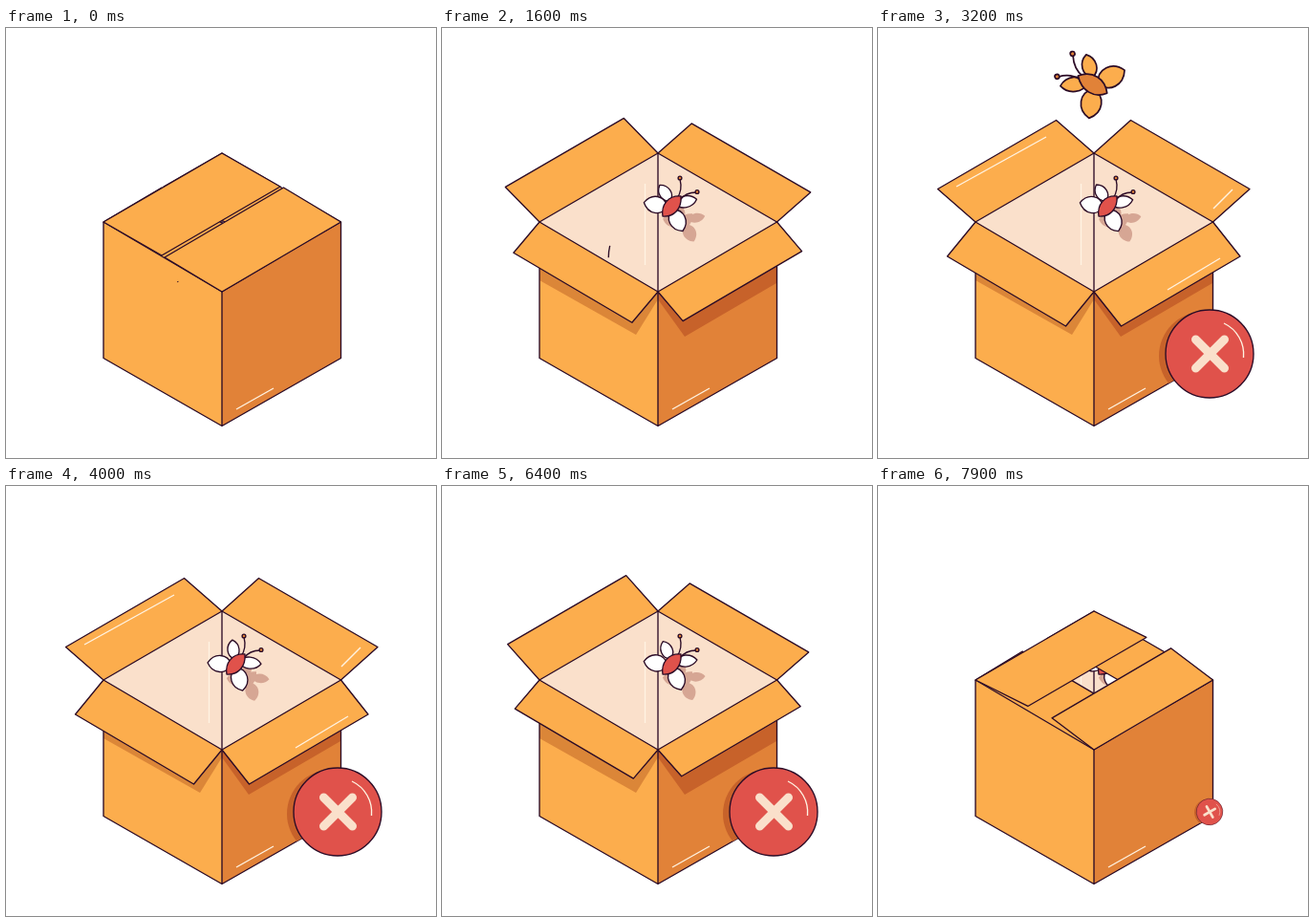
An HTML page that plays this animation: 450 by 450 pixels, repeating every 8 s.

```html
<!DOCTYPE html>
<html>
<head>
<meta charset="utf-8">
<style>
  html, body { margin: 0; width: 100%; height: 100%; overflow: hidden; background: #fff; }
  svg { display: block; width: 100vw; height: 100vh; }
</style>
</head>
<body>
<svg id="stage" viewBox="0 0 450 450"></svg>
<script>
const LOOP = 8000, STEP = 100;
const INK = '#2b0b26', ORANGE = '#fcad4d', DEEP = '#e18238', CREAM = '#fae0cb',
      RED = '#e0524b', SHADE = '#c7622a', SHINE = '#fff3e2';

const back = [226, 131], left = [102, 203], right = [350.5, 203], front = [226, 276];
const baseLeft = [102, 345.5], baseRight = [350.5, 345.5], base = [226, 416.5];
const faceRight = [front, right, baseRight, base];

// The free edge of a flap bends from closed to open; pace makes it lag or lead.
const flaps = [
  { hinge: [left, front], closed: [61, -36], bend: [-7, -2], open: [-29.5, 36], pace: 1 },
  { hinge: [back, right], closed: [-61, 35], bend: [6, 0], open: [38.5, -34.5], pace: 1 },
  { hinge: [left, back], closed: [61, 35], bend: [-11, -54], open: [-39.5, -34.5], pace: 1.3 },
  { hinge: [front, right], closed: [-60, -36], bend: [0, -30], open: [28.5, 36], pace: .82 }
];

const ramp = (t, from, to) => Math.min(1, Math.max(0, (t - from) / (to - from)));
const smooth = u => u * u * (3 - 2 * u);
const mix = (a, b, u) => a + (b - a) * u;
const between = (t, from, to, fade) => ramp(t, from, from + fade) - ramp(t, to, to + fade);

const poly = (points, fill, extra = '') =>
  `<polygon points="${points.join(' ')}" fill="${fill}" ${extra}/>`;
const line = (x1, y1, x2, y2, color = SHINE) =>
  `<line x1="${x1}" y1="${y1}" x2="${x2}" y2="${y2}" stroke="${color}"/>`;
const group = (transform, content, extra = '') => `<g transform="${transform}" ${extra}>${content}</g>`;

function flap({ hinge: [a, b], closed, bend, open, pace }, openness) {
  const q = openness ** pace;
  const [dx, dy] = closed.map((c, i) => mix(mix(c, bend[i], q), mix(bend[i], open[i], q), q));
  return poly([a, [a[0] + dx, a[1] + dy], [b[0] + dx, b[1] + dy], b], ORANGE, `stroke="${INK}"`);
}

function leaf(x, y, angle, length, width) {
  const w = width * .67;
  return group(`translate(${x} ${y}) rotate(${angle})`,
    `<path d="M0 0C${length * .2} ${-w} ${length * .75} ${-w} ${length} 0C${length * .75} ${w} ${length * .2} ${w} 0 0Z"/>`);
}

function wings(beat, sway) {
  return leaf(-1, -6, -92 - 32 * beat * sway, 20, 12) + leaf(4, -3, 8 - 20 * beat, 23, 12)
    + leaf(-4, 0, 184 + 6 * beat, 25, 17) + leaf(1, 3, 76 - 12 * beat, 25, 17);
}

const body = '<path d="M-9 10C-11 -2 -3 -12 10 -11C11 2 3 11 -9 10Z"/>';

function butterfly(beat, wingColor, bodyColor, sway = 1) {
  return `<g fill="${wingColor}" stroke="${INK}">${wings(beat, sway)}
    <path d="M6 -9Q12 -17 9 -29M9 -7Q15 -15 26 -15" fill="none"/>
    <g fill="${DEEP}"><circle cx="9" cy="-30" r="1.9"/><circle cx="27" cy="-15.5" r="1.9"/></g>
    <g fill="${bodyColor}">${body}</g></g>`;
}

function flyer(t, beat) {
  if (t < 1600 || t > 3800) return '';
  const rise = 1 - (1 - ramp(t, 1600, 2500)) ** 3, leave = ramp(t, 2500, 3800) ** 2;
  const x = mix(200, 252, rise) - 92 * leave, y = mix(215, 103, rise) - 150 * leave;
  const size = 1.25 * ramp(t, 1600, 2100);
  return group(`translate(${x} ${y}) rotate(-17) scale(${-size} ${size})`,
    butterfly(beat, ORANGE, DEEP, 0));
}

// A short stroke that travels along a curve.
function trail(t) {
  if (t > 2700) return '';
  const head = Math.max(.01, ramp(t, 0, 2500) ** 2), tail = Math.max(0, head - .13);
  return `<path d="M180 266C165 235 180 192 217 200" pathLength="1" fill="none" stroke="${INK}"
    stroke-dasharray="${head - tail} 2" stroke-dashoffset="${-tail}"/>`;
}

function badgeScale(t) {
  const age = t - 1630;
  if (age <= 0) return 0;
  const spring = 1 - Math.exp(-age * .00475) * Math.cos(age / 900 * 2 * Math.PI);
  return spring * (1 - smooth(ramp(t, 6677, 8600)));
}

function badge(s) {
  if (s <= 0) return '';
  const tilt = Math.max(0, .8 - s) * 30;
  return `<g clip-path="url(#side)"><circle cx="${347 - 7 * s}" cy="${341 + 2 * s}" r="${46 * s}" fill="${SHADE}"/></g>`
    + group(`translate(347 341) scale(${s}) rotate(${tilt})`,
      `<circle r="46" fill="${RED}" stroke="${INK}"/>
       <path d="M-14.5 -15L15.5 15M15.5 -15L-14.5 15" stroke="${CREAM}" stroke-width="9" stroke-linecap="round"/>
       <path d="M15 -32A36 36 0 0 1 35.5 4" fill="none" stroke="${SHINE}"/>`);
}

function draw(t) {
  const beat = (1 - Math.cos((t - 800) / 226.7 * 2 * Math.PI)) / 2;
  const openness = smooth(ramp(t, 0, 1850)) - smooth(ramp(t, 6000, 8330));
  const shade = `fill-opacity="${between(t, 1000, 7050, 350)}"`;
  return `<defs><clipPath id="side">${poly(faceRight, '#000')}</clipPath></defs>
  <rect width="450" height="450" fill="#fff"/>
  <g stroke-width="1.35" stroke-linejoin="round">`
  + poly([left, front, base, baseLeft], ORANGE) + poly(faceRight, DEEP)
  + poly([left, [102, 264], [203, 321], [226, 284], front], '#db8638', shade)
  + poly([front, [226, 284], [254, 323], [350, 267], right], SHADE, shade)
  + `<path d="M${left}L${baseLeft}L${base}L${baseRight}L${right}M${front}L${base}" fill="none" stroke="${INK}"/>`
  + line(241, 399, 280, 377)
  + poly([left, back, right, front], CREAM)
  + line(...back, ...front, INK) + line(212.5, 163, 212.5, 248)
  + group('translate(254 203) scale(.8)', wings(beat, 1) + body, 'fill="#d6a694"')
  + group('translate(240 187)', butterfly(beat, '#fff', RED))
  + flaps.map(f => flap(f, openness)).join('')
  + `<g opacity="${between(t, 1600, 5900, 250)}">`
  + line(82, 166, 176, 114) + line(351, 189, 371, 169) + line(303, 274, 358, 241) + '</g>'
  + trail(t) + flyer(t, beat) + badge(badgeScale(t)) + '</g>';
}

const stage = document.getElementById('stage');
const start = performance.now();
let shown = -1;
function tick() {
  const t = Math.floor((performance.now() - start) % LOOP / STEP) * STEP;
  if (t !== shown) stage.innerHTML = draw(shown = t);
  requestAnimationFrame(tick);
}
tick();
</script>
</body>
</html>
```
